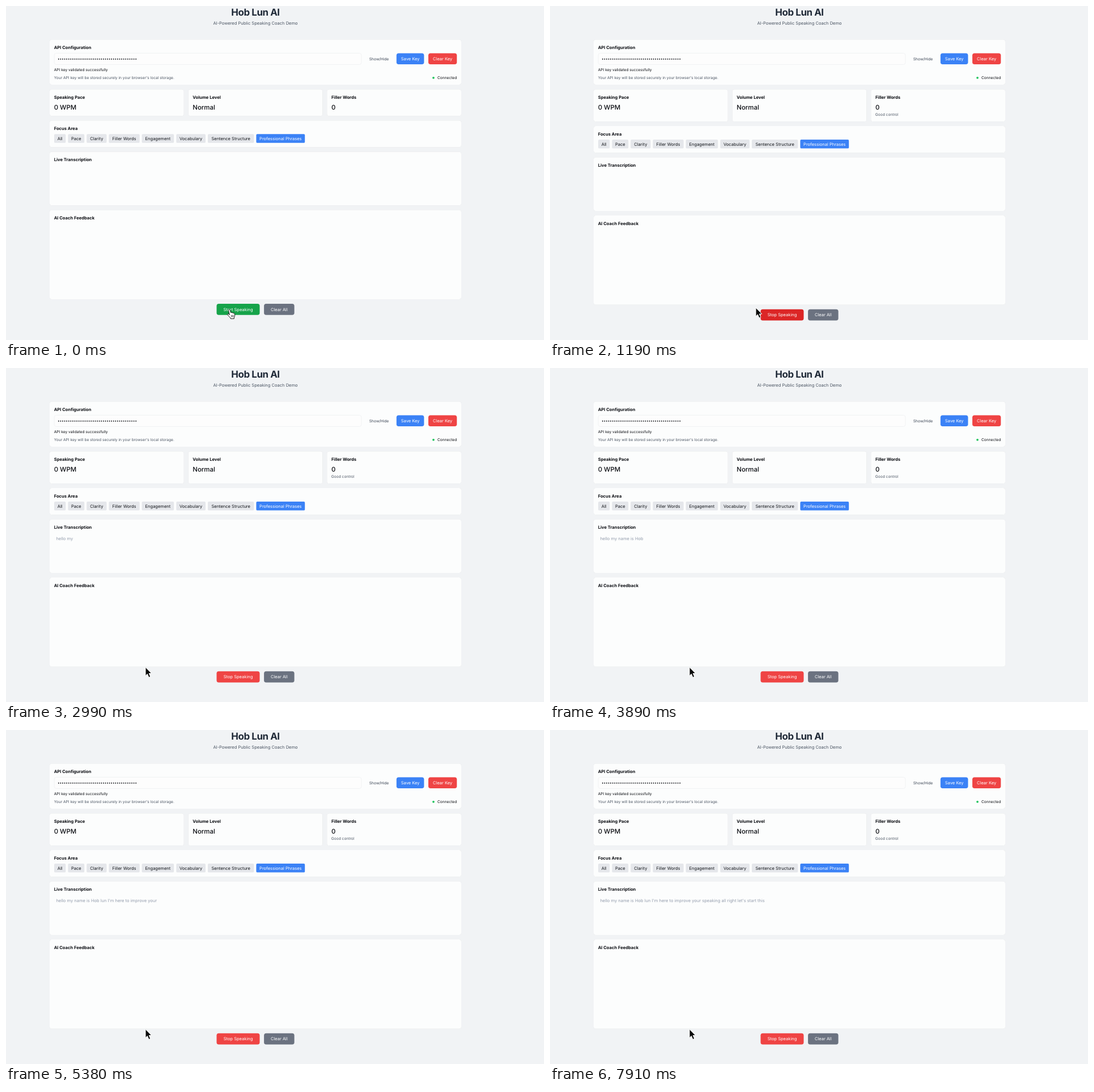
Animation, 949 px wide and 590 px high, one loop 8 s. Source, as an HTML page:

```html
<!DOCTYPE html>
<html lang="en">
<head>
<meta charset="utf-8">
<title>Speaking coach</title>
<style>
  html, body { margin: 0; width: 100%; height: 100%; overflow: hidden; background: #f1f3f5; }
  svg { display: block; width: 949px; height: 590px; }
  text { font-family: Inter, sans-serif; text-rendering: geometricPrecision; white-space: pre; }
  .card { fill: #fcfdfd; filter: drop-shadow(0 .7px .6px rgba(0, 0, 0, .15)); }
</style>
</head>
<body>
<svg id="stage" viewBox="0 0 949 590">
  <g id="fixed"></g>
  <g id="lower"></g>
  <g id="hand" stroke="#111" stroke-width="1" stroke-linejoin="round" stroke-linecap="round">
    <path fill="#fff" d="M394.2 545.2 L392.6 538.4 C392.2 536.2 394.7 535.6 395.3 537.6 L396.5 541.7 C397.3 540.8 398.7 541.1 399 542.2 C399.8 541.5 401 541.9 401.3 542.9 C402.3 542.4 403.3 543.1 403.4 544.2 C403.7 546.5 403.5 548.6 402.3 550.3 V552.3 H396.2 L395.8 550.7 C394.2 549.3 392.6 547.5 390.8 545.6 C390.1 544 391.8 543.2 393 544.2 Z"/>
    <path fill="none" stroke-width=".7" d="M397.4 546.3 l.3 3.2 M399.3 546.1 l.2 3.2 M401.2 545.9 v3.2"/>
  </g>
  <path id="arrow" fill="#0a0a0a" stroke="#fff" stroke-width="1" stroke-linejoin="round"
    d="M0 0 V15.2 L3.4 12 L5.9 18 L8.8 16.8 L6.3 11 H10.8 Z"/>
</svg>
<script>
  const $ = id => document.getElementById(id);
  const INK = '#0b0d12', MUTED = '#4b5563', BLUE = '#3b82f6', RED = '#ef4444';
  const BASE = 7.52, SMALL = 6.64;

  function add(parent, tag, attrs, text) {
    const el = document.createElementNS('http://www.w3.org/2000/svg', tag);
    for (const key in attrs) el.setAttribute(key, attrs[key]);
    if (text) el.textContent = text;
    return parent.appendChild(el);
  }
  // y is the middle of the capital letters
  function label(parent, x, y, text, size = BASE, fill = INK, more = {}) {
    return add(parent, 'text', { x, y: y + size * .364, 'font-size': size, fill, ...more }, text);
  }
  const centred = { 'text-anchor': 'middle' };
  const heading = (parent, x, y, text) => label(parent, x, y, text, 7.58, INK, { 'font-weight': 700 });
  const box = (parent, x, y, width, height, rx, attrs) =>
    add(parent, 'rect', { x, y, width, height, rx, ...attrs });
  const card = (parent, x, y, w, h) => box(parent, x, y, w, h, 3.8, { class: 'card' });
  function button(parent, x, y, w, h, text, fill, ink = '#fff', rx = 3.8) {
    return {
      rect: box(parent, x, y, w, h, rx, { fill }),
      text: label(parent, x + w / 2, y + h / 2, text, BASE, ink, centred)
    };
  }

  const fixed = $('fixed'), lower = $('lower');

  label(fixed, 440, 10.6, 'Hob Lun AI', 16.9, '#1f2937',
    { ...centred, 'font-weight': 700, 'letter-spacing': '-.025em' });
  label(fixed, 440, 30, 'AI-Powered Public Speaking Coach Demo', BASE, MUTED, centred);

  card(fixed, 77, 59.3, 726, 79.7);
  heading(fixed, 84.7, 73.3, 'API Configuration');
  box(fixed, 85.2, 83.4, 541.6, 20, 3.5, { fill: '#fdfdfd', stroke: '#eff0f2', 'stroke-width': .8 });
  add(fixed, 'path', {
    d: 'M92.8 93.7 H229.5', stroke: INK, 'stroke-width': 1.9,
    'stroke-linecap': 'round', 'stroke-dasharray': '0 3.59'
  });
  label(fixed, 658, 93.4, 'Show/Hide', SMALL, '#374151', centred);
  button(fixed, 688.8, 83.5, 48.6, 19.6, 'Save Key', BLUE);
  button(fixed, 745, 83.5, 50.3, 19.6, 'Clear Key', RED);
  label(fixed, 84.8, 112.6, 'API key validated successfully', SMALL);
  label(fixed, 84.8, 126.6, "Your API key will be stored securely in your browser's local storage.", SMALL, MUTED);
  add(fixed, 'circle', { cx: 754, cy: 126.8, r: 1.9, fill: '#22c55e' });
  label(fixed, 795.3, 126.6, 'Connected', SMALL, INK, { 'text-anchor': 'end' });

  const stats = [['Speaking Pace', '0 WPM'], ['Volume Level', 'Normal'], ['Filler Words', '0']]
    .map(([name, value], i) => {
      const x = 77 + i * 244.6;
      const rect = card(fixed, x, 147.2, 236.8, 47.2);
      heading(fixed, x + 7.7, 161.2, name);
      label(fixed, x + 7.7, 179.2, value, 11.4, INK, { 'font-weight': 500 });
      return rect;
    });
  const verdict = label(fixed, 573.8, 191.6, 'Good control', SMALL, MUTED);

  card(lower, 77, 202.3, 726, 47.2);
  heading(lower, 84.7, 216.2, 'Focus Area');
  [['All', 85, 20.3], ['Pace', 109.4, 28.8], ['Clarity', 142.2, 35.3], ['Filler Words', 181.4, 54.3],
   ['Engagement', 239.6, 56.6], ['Vocabulary', 300.3, 51.7], ['Sentence Structure', 356, 81.4],
   ['Professional Phrases', 441.4, 85.8]].forEach(([text, x, w], i) =>
    button(lower, x, 226.2, w, 15.6, text, i < 7 ? '#e5e7eb' : BLUE, i < 7 ? '#14171c' : '#fff', 1.9));
  card(lower, 77, 257.5, 726, 94.8);
  heading(lower, 84.7, 271.6, 'Live Transcription');
  const speech = label(lower, 88.4, 291.2, '', BASE, '#949dad');
  card(lower, 77, 360.2, 726, 157.8);
  heading(lower, 84.7, 374.4, 'AI Coach Feedback');
  const talk = button(lower, 371.5, 526, 76, 19.8, 'Start Speaking', '#16a34a');
  button(lower, 455.1, 526, 53.5, 19.8, 'Clear All', '#6b7280');

  const words = [
    [2540, 'hello'], [2990, ' my'], [3140, ' name is'], [3890, ' Hob'], [4180, ' lun'], [4330, " I'm"],
    [4480, ' here'], [4630, ' to'], [5080, ' improve'], [5380, ' your'], [5670, ' speak'], [5820, 'ing'],
    [6720, ' all'], [6870, ' right'], [7170, " let's"], [7320, ' start'], [7910, ' this']
  ];
  const stops = [[1190, 363, 533], [1340, 255, 516.5], [1490, 246, 528.5]];

  function heard(t) {
    const text = words.filter(([at]) => t >= at).map(([, word]) => word).join('');
    // one word is briefly misheard
    return t >= 4030 && t < 4180 ? text.replace('Hob', 'Hop') : text;
  }

  function draw(t) {
    const live = t >= 750;
    stats.forEach(rect => rect.setAttribute('height', live ? 57.1 : 47.2));
    verdict.style.display = live ? '' : 'none';
    lower.setAttribute('transform', `translate(0 ${live ? 9.8 : 0})`);
    talk.text.textContent = live ? 'Stop Speaking' : 'Start Speaking';
    talk.rect.setAttribute('fill', !live ? '#16a34a' : t < 1340 ? '#dc2626' : RED);
    speech.textContent = heard(t);

    const stop = stops.filter(([at]) => t >= at).pop();
    $('hand').style.display = stop ? 'none' : '';
    $('arrow').style.display = stop ? '' : 'none';
    if (stop) $('arrow').setAttribute('transform', `translate(${stop[1]} ${stop[2]})`);
  }

  const start = performance.now();
  function tick() {
    draw((performance.now() - start) % 8000);
    requestAnimationFrame(tick);
  }
  tick();
</script>
</body>
</html>
```
